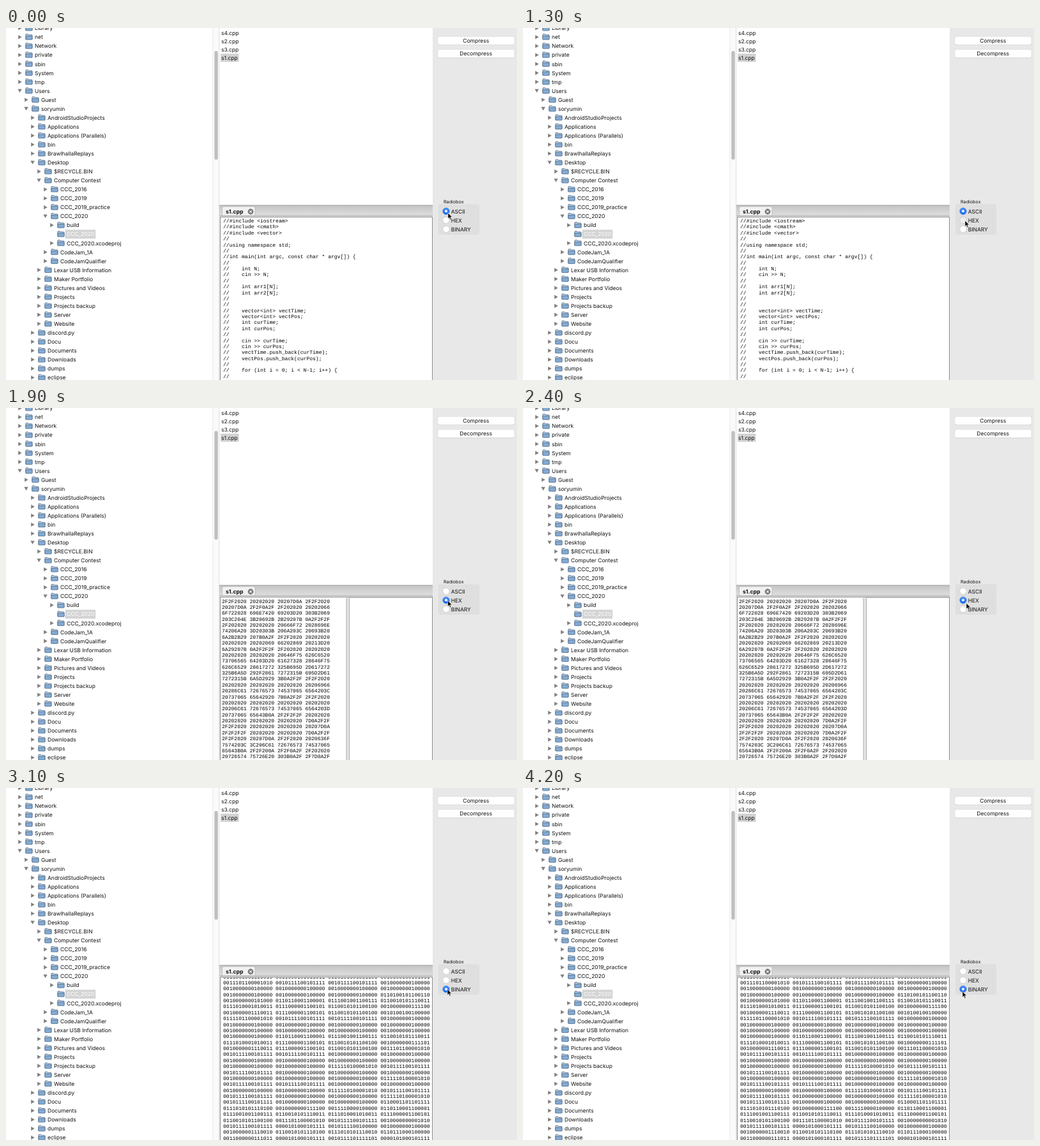
An HTML page for the animation above (4.5 s loop, 800 px wide and 552 px high).

```html
<!DOCTYPE html>
<html lang="en">
<head>
<meta charset="utf-8">
<title>File viewer</title>
<style>
  html, body { margin: 0; width: 100%; height: 100%; overflow: hidden; background: #fff; }
  svg { display: block; width: 800px; height: 552px; }
  text { font: 8.5px Inter, Roboto, sans-serif; fill: #111; white-space: pre; text-rendering: geometricPrecision; }
  .mono text { font: 8.06px "Liberation Mono", "Courier New", monospace; fill: #000; }
</style>
</head>
<body>
<svg id="stage" viewBox="0 0 800 552">
  <defs>
    <linearGradient id="bar" x2="0" y2="1"><stop stop-color="#c4c4c4"/><stop offset="1" stop-color="#dedede"/></linearGradient>
    <linearGradient id="blue" x2="0" y2="1"><stop stop-color="#4a94fb"/><stop offset="1" stop-color="#1768f2"/></linearGradient>
    <clipPath id="editor"><rect x="336" y="297.5" width="331" height="255"/></clipPath>
    <g id="folder">
      <path d="M.5 8.5V1.2Q.5.5 1.2.5H4.2L5.2 1.7H9.8Q10.6 1.7 10.6 2.5V8.5Z" fill="#b3cbe2" stroke="#5f7690" stroke-width=".9"/>
      <path d="M.5 3.5H10.6V8.6Q10.6 9.1 10 9.1H1.1Q.5 9.1.5 8.6Z" fill="#84abd3" stroke="#526c8a" stroke-width=".8"/>
    </g>
  </defs>
</svg>
<script>
const stage = document.getElementById('stage');

function add(tag, attrs, parent = stage, content = '') {
  const node = document.createElementNS('http://www.w3.org/2000/svg', tag);
  for (const key in attrs) node.setAttribute(key, attrs[key]);
  node.textContent = content;
  return parent.appendChild(node);
}
const rect = (x, y, width, height, fill, more) => add('rect', { x, y, width, height, fill, ...more });
const label = (x, y, content, style = '', parent = stage) => add('text', { x, y, style }, parent, content);

// Directory tree: depth digit, state (+ closed, - open, = selected leaf), name
const tree = `0+Library
0+net
0+Network
0+private
0+sbin
0+System
0+tmp
0-Users
1+Guest
1-soryumin
2+AndroidStudioProjects
2+Applications
2+Applications (Parallels)
2+bin
2+BrawlhallaReplays
2-Desktop
3+$RECYCLE.BIN
3-Computer Contest
4+CCC_2016
4+CCC_2019
4+CCC_2019_practice
4-CCC_2020
5+build
5=CCC_2020
5+CCC_2020.xcodeproj
4+CodeJam_1A
4+CodeJamQualifier
3+Lexar USB Information
3+Maker Portfolio
3+Pictures and Videos
3+Projects
3+Projects backup
3+Server
3+Website
2+discord.py
2+Docu
2+Documents
2+Downloads
2+dumps
2+eclipse`.split('\n');

tree.forEach((row, i) => {
  const x = 45 + 10 * row[0], y = 0.2 + 14.05 * i, state = row[1];
  const selected = state === '=';
  if (selected) rect(x - 2.3, y - 7, 47.5, 14, '#d4d4d4');
  else add('path', {
    d: state === '+' ? `M${x - 25.8} ${y - 3.2}l5.6 3.2l-5.6 3.2z` : `M${x - 26.6} ${y - 2.8}h6.4l-3.2 5.6z`,
    fill: '#808080'
  });
  add('use', { href: '#folder', x: x - 14.6, y: y - 5.2 });
  label(x, y + 3.1, row.slice(2), selected ? 'fill:#fff' : '');
});

// Scrollbar and file list
rect(323.5, 0, 10.5, 552, '#fafafa');
rect(323.5, 0, .8, 552, '#e6e6e6');
rect(333.3, 0, .8, 552, '#d8d8d8');
rect(326.3, 36, 5.4, 170.5, '#bebebe', { rx: 2.7 });
rect(336, 40.3, 28.5, 12.7, '#d2d2d2');
['s4', 's2', 's3', 's1'].forEach((name, i) => label(337, 11.4 + 12.7 * i, name + '.cpp'));

// Editor frame and tab
rect(334, 278, 334, 16, 'url(#bar)');
rect(334, 277.5, 334, 1.3, '#a9a9a9');
rect(338.5, 280, 51.5, 15, '#f1f1f1', { rx: 2.5, stroke: '#b4b4b4', 'stroke-width': .7 });
rect(334, 293.8, 334, 1, '#9b9b9b');
rect(334, 294.8, 334, 258, '#e4e4e4');
rect(335.5, 296.5, 332, 256, '#fff', { stroke: '#8c8c8c' });
label(344, 291, 's1.cpp', 'font-weight:700;font-size:8.7px');
add('circle', { cx: 383, cy: 288, r: 4.4, fill: '#777' });
add('path', { d: 'M381.3 286.3l3.4 3.4m0-3.4l-3.4 3.4', stroke: '#fff', 'stroke-width': 1.1 });

const code = `#include <iostream>
#include <cmath>
#include <vector>

using namespace std;

int main(int argc, const char * argv[]) {

    int N;
    cin >> N;

    int arr1[N];
    int arr2[N];


    vector<int> vectTime;
    vector<int> vectPos;
    int curTime;
    int curPos;

    cin >> curTime;
    cin >> curPos;
    vectTime.push_back(curTime);
    vectPos.push_back(curPos);

    for (int i = 0; i < N-1; i++) {
`.split('\n').map(line => '//' + line);

// End of the file in 16-byte rows, shown as hex and as binary
const tail = [
  '//        }\n//  ', '  }\n//\n//      f', 'or (int i = 0; i', ' < N; i++) {\n///',
  '/        for (in', 't j = 0; j < i; ', 'j++) {\n///      ', '       if (i != ',
  'j) {\n////       ', '         double ', 'speed = abs((dou', 'ble)(arr2[i]-arr',
  '2[j])/(arr1[i]-a', 'rr1[j]));\n////  ', '              if', ' (largestSpeed <',
  ' speed) {\n////  ', ' '.repeat(16), '  largestSpeed =', ' speed;\n////    ',
  '            }\n//', '//            }\n', '////        }\n//', '//    }\n//    co',
  'ut << largestSpe', 'ed;\n// \n//\n//   ', ' return 0;\n//}\n/'
].join('');

function dump(bytes, perRow, perGroup, base, digits) {
  const cells = [...bytes].map(c => c.charCodeAt(0).toString(base).toUpperCase().padStart(digits, '0'));
  const rows = [];
  for (let i = 0; i < cells.length; i += perRow) {
    let row = '';
    for (let j = 0; j < perRow; j++) row += (j && j % perGroup === 0 ? ' ' : '') + cells[i + j];
    rows.push(row);
  }
  return rows;
}

function pane(x, y, rows) {
  const group = add('g', { class: 'mono', 'clip-path': 'url(#editor)' });
  rows.forEach((row, i) => label(x, y + 9.375 * i, row, '', group));
  return group;
}
const panes = [
  pane(340, 305, code),
  pane(338, 305.5, dump(tail, 16, 4, 16, 2)),
  pane(340, 298.5, dump(tail.slice(13 * 16), 8, 2, 2, 8))
];
add('rect', { x: 533, y: 297, width: 5, height: 255, fill: '#e4e4e4' }, panes[1]);
add('path', { d: 'M533 297.5V552M537.5 552V297.5H667', fill: 'none', stroke: '#a5a5a5', 'stroke-width': .9 }, panes[1]);

// Controls
rect(668, 0, 132, 552, '#e8e8e8');
['Compress', 'Decompress'].forEach((name, i) => {
  const y = 13.4 + 20.3 * i;
  rect(676, y + .6, 120, 13, '#c3c3c3', { rx: 2.8 });
  rect(676, y, 120, 13, '#fff', { rx: 2.8, stroke: '#d4d4d4', 'stroke-width': .5 });
  label(735.7, y + 9.5, name, 'text-anchor:middle');
});
label(685, 274.8, 'Radiobox', 'font-size:7.2px');
rect(677.5, 277, 63, 46.5, '#dfdfdf', { rx: 2, stroke: '#d9d9d9', 'stroke-width': .6 });
const radios = ['ASCII', 'HEX', 'BINARY'].map((name, i) => {
  const cx = 689, cy = 287.3 + 14.05 * i;
  label(696.7, cy + 3.2, name);
  return {
    ring: add('circle', { cx, cy, r: 5.2, 'stroke-width': .6 }),
    dot: add('circle', { cx, cy, r: 2, fill: '#fff' })
  };
});

const pointer = add('path', {
  d: 'M0 0V9.2L2.1 7.2L3.6 10.8L5.2 10.1L3.7 6.7H6.6Z',
  fill: '#000', stroke: '#fff', 'stroke-width': .6
});

// Pointer path: time, x, y
const path = [
  [0, 692, 290], [100, 692, 290], [200, 692, 291], [500, 692, 291], [800, 697, 296], [1000, 694, 301],
  [1200, 692, 302], [1800, 692, 302], [1900, 691.6, 302], [2000, 691.6, 302], [2100, 692, 301],
  [2300, 694, 304], [2400, 694, 306], [2600, 688, 314.5], [2900, 691, 315.5], [3500, 691, 315.5],
  [3600, 690, 316.5], [3800, 685, 319.5], [3900, 685, 319.5], [4200, 688, 319], [4500, 688, 319]
];

function pointerAt(t) {
  const i = path.findIndex(p => p[0] > t);
  const [t0, x0, y0] = path[i - 1], [t1, x1, y1] = path[i];
  const k = (t - t0) / (t1 - t0);
  return [x0 + (x1 - x0) * k, y0 + (y1 - y0) * k];
}

function draw(now) {
  const t = Math.floor(now % 4500 / 100) * 100;
  const mode = t < 1400 ? 0 : t < 3100 ? 1 : 2;
  const pressed = t >= 1200 && t < 1400 ? 1 : t >= 2900 && t < 3100 ? 2 : -1;
  panes.forEach((p, i) => p.style.display = i === mode ? '' : 'none');
  radios.forEach(({ ring, dot }, i) => {
    const on = i === mode;
    ring.setAttribute('fill', on ? 'url(#blue)' : i === pressed ? '#ededed' : '#fff');
    ring.setAttribute('stroke', on ? '#2470e8' : '#c2c2c2');
    dot.style.display = on ? '' : 'none';
  });
  pointer.setAttribute('transform', `translate(${pointerAt(t)})`);
}

const start = performance.now();
function tick() {
  draw(performance.now() - start);
  requestAnimationFrame(tick);
}
tick();
</script>
</body>
</html>
```
